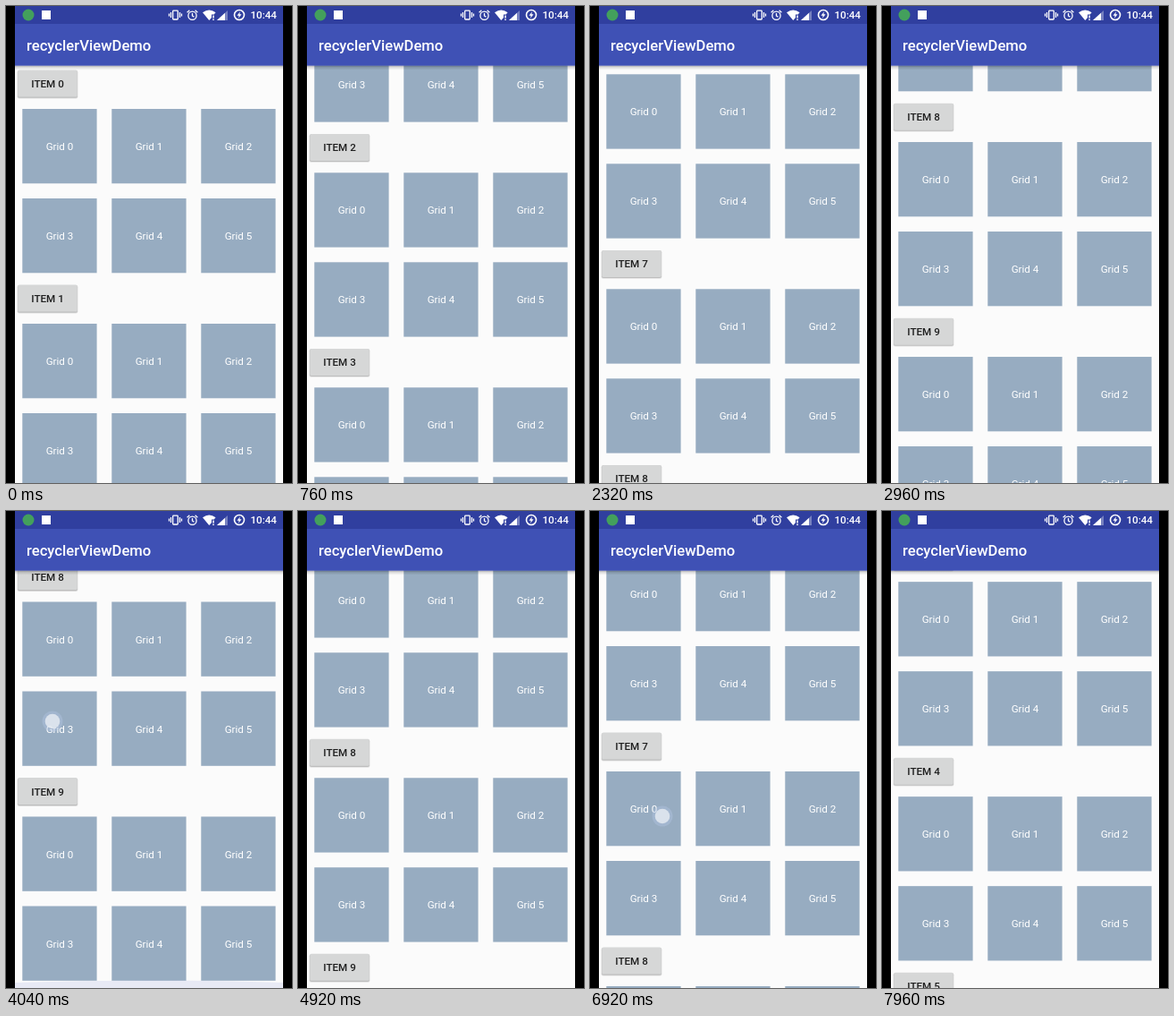
These frames come from a looping animation (320 px wide and 533 px high, 8 s). An HTML page:

```html
<!DOCTYPE html>
<html lang="en">
<head>
<meta charset="utf-8">
<title>recyclerViewDemo</title>
<style>
html, body { margin: 0; width: 100%; height: 100%; overflow: hidden; background: #000; }
svg { display: block; width: 100vw; height: 100vh; }
text { font-family: Roboto, sans-serif; font-size: 11.67px; }
.cell { fill: #97acc1; }
.label { fill: #fff; text-anchor: middle; }
.button { fill: #d6d7d7; }
.caption { fill: #1f1f1f; font-weight: 500; text-anchor: middle; }
.line { fill: none; stroke: #fff; stroke-width: 1.3; }
</style>
</head>
<body>
<svg viewBox="0 0 320 533">
  <defs>
    <clipPath id="screen"><rect x="10" width="300" height="533"/></clipPath>
    <linearGradient id="shade" x2="0" y2="1">
      <stop stop-opacity=".32"/>
      <stop offset=".4" stop-opacity=".12"/>
      <stop offset="1" stop-opacity="0"/>
    </linearGradient>
  </defs>
  <rect width="320" height="533"/>
  <g clip-path="url(#screen)">
    <rect x="10" width="300" height="533" fill="#fbfbfb"/>
    <g id="list"></g>
    <path id="glow" fill="#3f51b5" opacity=".1"/>

    <rect x="10" y="66.6" width="300" height="5" fill="url(#shade)"/>
    <rect x="10" y="20" width="300" height="46.7" fill="#3f51b5"/>
    <rect x="10" width="300" height="20" fill="#303f9f"/>
    <text x="23" y="49.7" fill="#fff" style="font-size:16.67px;font-weight:500">recyclerViewDemo</text>

    <circle cx="25" cy="10" r="6.5" fill="#43a05c"/>
    <rect x="40" y="5" width="10" height="10" fill="#fff"/>
    <g class="line">
      <rect x="186.7" y="5.2" width="5.6" height="9.8" rx=".8"/>
      <path d="M184.5 7v6M194.5 7v6M182.5 8.5v3M196.5 8.5v3"/>
      <circle cx="208.5" cy="10.7" r="4.6"/>
      <path d="M208.5 8v3l2 1.3M202.6 7.2l2.8-2.4M214.4 7.2l-2.8-2.4"/>
      <circle cx="261" cy="10" r="5.5" stroke-width="1.6"/>
    </g>
    <g fill="#fff">
      <path d="M220 7.2Q227.3 2 234.6 7.2L232.6 9.6H230V13L227.3 16Z"/>
      <path d="M231.3 10.5h1.5v3h-1.5zM231.3 14.5h1.5v1.5h-1.5z"/>
      <path d="M236 16L248 5V16Z" opacity=".35"/>
      <path d="M236 16L245 7.7V16Z"/>
      <path d="M262 6.3L258.5 10.8H260.7L260 13.8L263.6 9.2H261.3Z"/>
      <text x="303" y="14.2" text-anchor="end" font-weight="500">10:44</text>
    </g>

    <g id="touch">
      <circle r="11.5" fill="#b4c6e4" opacity=".4"/>
      <circle r="8.3" fill="#e6ecf2" opacity=".82"/>
    </g>
  </g>
</svg>
<script>
const LOOP = 8000, STEP = 40, END = 1933.5, ROW = 240;
const $ = id => document.getElementById(id);
const list = $('list'), glow = $('glow'), touch = $('touch');

const lin = p => p;
const quadIn = p => p * p;
const quadOut = p => 1 - (1 - p) ** 2;
const mix = (a, b, p) => a + (b - a) * p;

// start, end, scroll from, scroll to, easing, finger [x0, x1, y0, y1]
const moves = [
  [80, 520, 0, 200, quadIn, [56, 50, 440, 240]],
  [520, 1440, 200, 660, quadOut],
  [1440, 1760, 660, 880, quadIn, [56, 50, 460, 240]],
  [1760, 2000, 880, 1230, lin],
  [2000, 2280, 1230, 1440, lin, [56, 50, 450, 240]],
  [2280, 3280, 1440, END, quadOut],
  [3440, 4160, END, END, lin, [52, 52, 400, 202]],
  [4240, 4680, END, 1790, lin, [60, 72, 250, 394]],
  [4680, 6480, 1790, 1576, quadOut],
  [6680, 7080, 1576, 1376, quadIn, [78.2, 86, 269, 469]],
  [7080, 8200, 1376, 726, quadOut]
];

function cell(i) {
  const x = 18.3 + i % 3 * 100, y = 115 + Math.floor(i / 3) * 100;
  return `<rect class="cell" x="${x}" y="${y}" width="83.3" height="83.3"/>
    <text class="label" x="${x + 41.7}" y="${y + 46}">Grid ${i}</text>`;
}

function section(n) {
  return `<g transform="translate(0 ${n * ROW})">
    <rect x="12.5" y="72" width="68" height="31.4" rx="2.2" opacity=".1"/>
    <rect x="13" y="72" width="67" height="30.7" rx="2" opacity=".16"/>
    <rect class="button" x="13.3" y="71.6" width="66.5" height="30" rx="1.7"/>
    <text class="caption" x="46.6" y="91">ITEM ${n}</text>
    ${[0, 1, 2, 3, 4, 5].map(cell).join('')}
  </g>`;
}

list.innerHTML = Array.from({ length: 10 }, (_, n) => section(n)).join('');

function draw(t) {
  const move = moves.findLast(m => m[0] <= t);
  let scroll = 0, finger = null, pull = 0;
  if (move) {
    const [t0, t1, from, to, ease, path] = move;
    const p = ease(Math.min(1, (t - t0) / (t1 - t0)));
    scroll = mix(from, to, p);
    if (path && t < t1) finger = [mix(path[0], path[1], p), mix(path[2], path[3], p)];
    if (from === END && to === END) pull = Math.min(1, p * 2) * Math.min(1, (4240 - t) / 80);
  }
  list.setAttribute('transform', `translate(0 ${-scroll.toFixed(2)})`);
  touch.style.display = finger ? '' : 'none';
  if (finger) touch.setAttribute('transform', `translate(${finger})`);
  glow.setAttribute('d', `M10 533V${533 - 6 * pull}Q160 ${533 - 11 * pull} 310 ${533 - 6 * pull}V533Z`);
}

const start = performance.now();
function tick() {
  const t = (performance.now() - start) % LOOP;
  draw(Math.floor(t / STEP) * STEP);
  requestAnimationFrame(tick);
}
draw(0);
requestAnimationFrame(tick);
</script>
</body>
</html>
```
